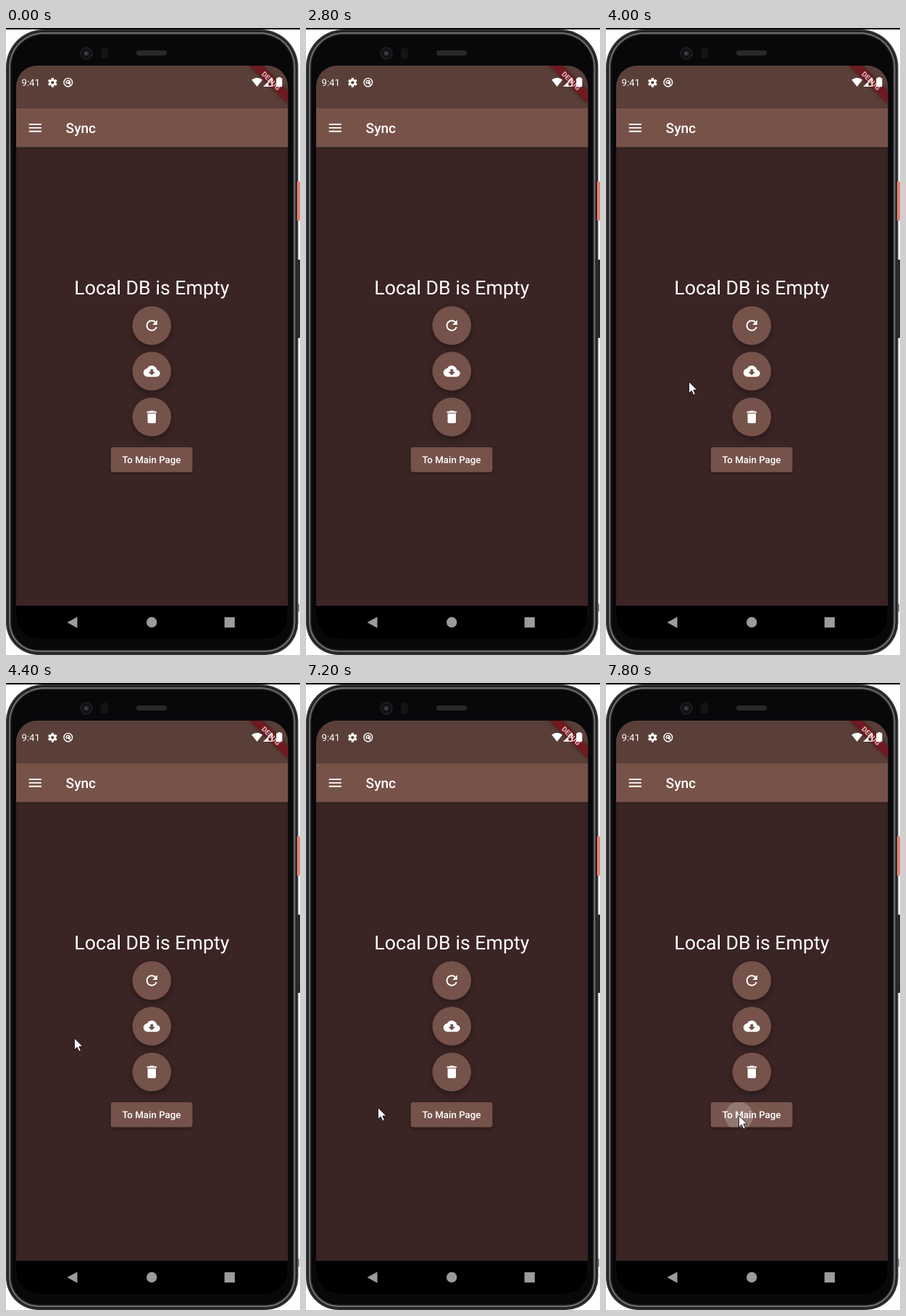
Write an HTML page with a canvas that moves like this. It is 406 by 866 pixels and loops after 8000 ms.

```html
<!DOCTYPE html>
<html lang="en">
<head>
<meta charset="utf-8">
<title>Sync screen</title>
<style>
html, body { margin: 0; width: 100%; height: 100%; overflow: hidden; background: #fff; }
canvas { display: block; width: 406px; height: 866px; }
</style>
</head>
<body>
<canvas id="stage" width="406" height="866"></canvas>
<script>
const ctx = document.getElementById('stage').getContext('2d');
const LOOP = 8000;
const MID = 201.3;
const BROWN = '#75524a';

// The pointer jumps: [time, x, y]; it is hidden before the first entry.
const POINTER = [
  [3000, 206, 496], [3200, 215, 432], [4000, 114, 488], [4200, 94, 490],
  [6800, 88, 508], [7000, 81, 535], [7200, 99, 586], [7400, 191, 600], [7600, 183, 597]
];

// Icons on a 24 unit grid.
const ICONS = {
  menu: 'M3 18h18v-2H3zM3 13h18v-2H3zM3 6v2h18V6z',
  refresh: 'M17.65 6.35C16.2 4.9 14.21 4 12 4c-4.42 0-7.99 3.58-7.99 8s3.57 8 7.99 8c3.73 0 6.84-2.55 7.73-6h-2.08c-.82 2.33-3.04 4-5.65 4-3.31 0-6-2.69-6-6s2.69-6 6-6c1.66 0 3.14.69 4.22 1.78L13 11h7V4z',
  cloud: 'M19.35 10.04C18.67 6.59 15.64 4 12 4 9.11 4 6.6 5.64 5.35 8.04 2.34 8.36 0 10.91 0 14c0 3.31 2.69 6 6 6h13c2.76 0 5-2.24 5-5 0-2.64-2.05-4.78-4.65-4.96zM17 13l-5 5-5-5h3V9h4v4z',
  trash: 'M6 19c0 1.1.9 2 2 2h8c1.1 0 2-.9 2-2V7H6zM19 4h-3.5l-1-1h-5l-1 1H5v2h14z'
};
for (const name in ICONS) ICONS[name] = new Path2D(ICONS[name]);

function rect(x, y, w, h, color) {
  ctx.fillStyle = color;
  ctx.fillRect(x, y, w, h);
}

function round(x, y, w, h, r) {
  ctx.beginPath();
  ctx.roundRect(x, y, w, h, r);
}

function disc(x, y, r, color) {
  ctx.beginPath();
  ctx.arc(x, y, r, 0, Math.PI * 2);
  ctx.fillStyle = color;
  ctx.fill();
}

function poly(points, color) {
  ctx.beginPath();
  points.forEach(([x, y]) => ctx.lineTo(x, y));
  ctx.closePath();
  ctx.fillStyle = color;
  ctx.fill();
}

function text(str, x, y, size, weight, align = 'left', color = '#fff') {
  ctx.font = `${weight} ${size}px Roboto, sans-serif`;
  ctx.textRendering = 'geometricPrecision';
  ctx.textAlign = align;
  ctx.fillStyle = color;
  ctx.fillText(str, x, y);
}

function icon(name, x, y) {
  ctx.save();
  ctx.translate(x, y);
  ctx.scale(0.955, 0.955);
  ctx.translate(-12, -12);
  ctx.fillStyle = '#fff';
  ctx.fill(ICONS[name]);
  ctx.restore();
}

function withShadow(blur, dy, alpha, draw) {
  ctx.save();
  ctx.shadowColor = `rgba(0,0,0,${alpha})`;
  ctx.shadowBlur = blur;
  ctx.shadowOffsetY = dy;
  draw();
  ctx.restore();
}

function drawBody() {
  rect(0, 0, 406, 866, '#fff');
  rect(0, 0, 406, 2, '#000');
  // Nested outlines form the metal rim.
  const rim = [[0, '#323234'], [2, '#202022'], [4, '#747477'], [5.8, '#303032'], [7.2, '#08080a']];
  for (const [inset, color] of rim) {
    const top = 52 - inset, bottom = 45 - inset;
    round(inset, 2 + inset, 403.5 - 2 * inset, 864 - 2 * inset, [top, top, bottom, bottom]);
    ctx.fillStyle = color;
    ctx.fill();
  }
  rect(402, 212, 4, 54, '#e8806f');
  rect(403, 320, 3, 108, '#242426');
  rect(403, 795, 2, 11, '#77777a');

  disc(111, 35, 9, '#1b1b1d');
  disc(111, 35, 6.5, '#101012');
  disc(111, 35, 3.5, '#2b2c32');
  disc(110.5, 35, 1.2, '#5b5c66');
  round(131, 27, 10, 16, 5);
  ctx.fillStyle = '#141416';
  ctx.fill();
  round(180, 31, 42, 7, 3.5);
  ctx.fillStyle = '#29292b';
  ctx.fill();
}

function drawBanner() {
  withShadow(5, 0, 0.5, () =>
    poly([[335.5, 51], [353, 51], [390, 89], [390, 105.5]], '#711920'));
  ctx.save();
  ctx.translate(366, 73);
  ctx.rotate(Math.PI / 4);
  text('DEBUG', 0, 3.6, 10, 900, 'center', '#d0adad');
  ctx.restore();
}

function drawGear(x, y) {
  ctx.save();
  ctx.translate(x, y);
  for (let i = 0; i < 6; i++) {
    rect(-1.6, -6.4, 3.2, 4, '#fff');
    ctx.rotate(Math.PI / 3);
  }
  ctx.restore();
  disc(x, y, 4.7, '#fff');
  disc(x, y, 2.1, '#5a3f38');
}

function drawStatus() {
  text('9:41', 21.5, 80, 13.2, 400);
  drawGear(64.3, 75.3);
  ctx.strokeStyle = '#fff';
  ctx.lineWidth = 1.4;
  ctx.beginPath();
  ctx.arc(85.8, 75.2, 5.8, 0, Math.PI * 2);
  ctx.stroke();
  ctx.beginPath();
  ctx.arc(85.8, 75, 2.7, Math.PI * 0.7, Math.PI * 2.3);
  ctx.stroke();
  disc(86.3, 75.7, 1.6, '#fff');
  ctx.beginPath();
  ctx.moveTo(86, 76);
  ctx.lineTo(89.5, 79);
  ctx.stroke();

  ctx.beginPath();
  ctx.moveTo(346.7, 81);
  ctx.lineTo(339.2, 71.6);
  ctx.quadraticCurveTo(346.7, 66, 354.2, 71.6);
  ctx.fillStyle = '#fff';
  ctx.fill();
  ctx.beginPath();
  ctx.moveTo(356.5, 80.4);
  ctx.lineTo(367.3, 80.4);
  ctx.lineTo(367.3, 69.8);
  ctx.closePath();
  ctx.lineWidth = 1.2;
  ctx.stroke();
  poly([[356, 81], [362.5, 81], [362.5, 74.5]], '#fff');
  rect(375.3, 68, 4, 2, '#fff');
  round(373.2, 69.3, 8.2, 12, 1);
  ctx.fillStyle = '#fff';
  ctx.fill();
}

function drawRoundButton(name, y) {
  withShadow(7, 3, 0.35, () => disc(MID, y, 26.8, BROWN));
  icon(name, MID, y);
}

function drawMainButton(t) {
  const shape = () => round(144.7, 579, 112.8, 34.4, 3.5);
  withShadow(4, 2, 0.3, () => {
    shape();
    ctx.fillStyle = BROWN;
    ctx.fill();
  });
  if (t >= 7600) {
    const late = t >= 7800;
    ctx.save();
    shape();
    ctx.clip();
    if (late) rect(144, 578, 114, 36, 'rgba(255,255,255,.025)');
    disc(183.5, 598, late ? 19.5 : 18, `rgba(255,255,255,${late ? 0.2 : 0.14})`);
    ctx.restore();
  }
  text('To Main Page', MID - 0.3, 601.2, 13.3, 500, 'center');
}

function drawNav() {
  rect(14, 798, 375, 46, '#000');
  poly([[84.5, 821], [98.5, 813.3], [98.5, 828.7]], '#9b9b9b');
  disc(201.2, 820.8, 7.2, '#9b9b9b');
  rect(301.7, 813.8, 14.2, 14.2, '#9b9b9b');
}

function drawScreen(t) {
  ctx.save();
  round(14, 52, 375.3, 792, [29, 29, 32, 32]);
  ctx.clip();
  rect(14, 52, 376, 792, '#3a2424');
  withShadow(3, 1, 0.15, () => rect(14, 111, 376, 53.5, '#775249'));
  rect(14, 52, 376, 59, '#5a3f38');
  icon('menu', 40.3, 137.9);
  text('Sync', 82.6, 144.9, 19.1, 500);
  drawBanner();
  drawStatus();
  text('Local DB is Empty', MID, 368.2, 26.74, 400, 'center');
  drawRoundButton('refresh', 411);
  drawRoundButton('cloud', 474);
  drawRoundButton('trash', 537.2);
  drawMainButton(t);
  drawNav();
  ctx.restore();
}

function drawPointer(t) {
  const spot = POINTER.findLast(p => t >= p[0]);
  if (!spot) return;
  ctx.save();
  ctx.translate(spot[1] + 0.5, spot[2] + 0.5);
  poly([[0, 0], [0, 16], [3.7, 12.5], [6.3, 18.3], [8.9, 17.2], [6.4, 11.5], [11.3, 11.5]], '#fff');
  ctx.strokeStyle = '#111';
  ctx.lineWidth = 0.9;
  ctx.stroke();
  ctx.restore();
}

const start = performance.now();
function frame() {
  const t = (performance.now() - start) % LOOP;
  drawBody();
  drawScreen(t);
  drawPointer(t);
  requestAnimationFrame(frame);
}
frame();
</script>
</body>
</html>
```
